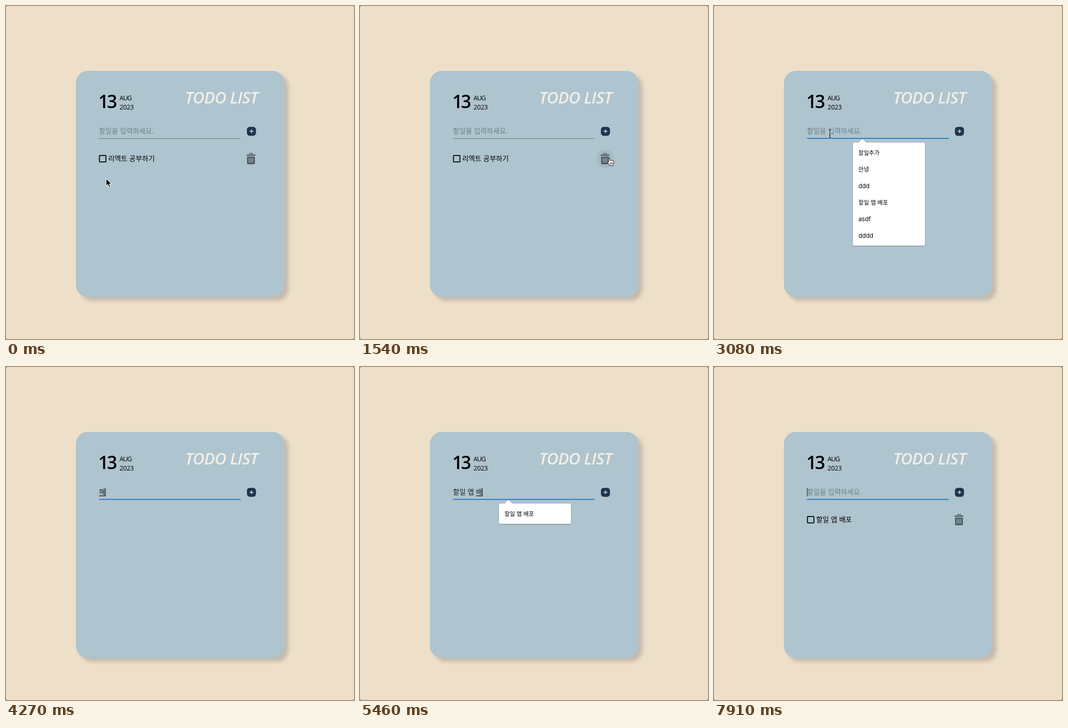
Animation of 754 by 724 pixels, one loop 8 s. Source, as an HTML page:

```html
<!DOCTYPE html>
<html lang="ko">
<head>
<meta charset="utf-8">
<title>Todo list</title>
<style>
  html, body { margin: 0; width: 100%; height: 100%; overflow: hidden; background: #2a2622; }
  svg { display: block; width: 754px; height: 724px; }
  text { white-space: pre; font: 15px "Noto Sans CJK KR", "Noto Sans CJK", sans-serif; }
  .latin { font-family: "Open Sans", "Noto Sans", sans-serif; }
  .day { font-size: 39px; font-weight: 600; letter-spacing: -3.6px; }
  .month { font-size: 14px; letter-spacing: -1.1px; }
  .year { font-size: 14px; letter-spacing: -.3px; }
  .title { font-size: 35px; font-weight: 600; font-style: italic; letter-spacing: -.7px; fill: #f1efe5; }
  .hint { fill: #6f7f88; }
  #menu text { font: 13px Inter, "Noto Sans CJK KR", "Noto Sans CJK", sans-serif; }
  #menu .ko { font-size: 12.4px; }
</style>
</head>
<body>
<svg viewBox="0 0 754 724">
  <defs>
    <filter id="soft" x="-10%" y="-10%" width="120%" height="120%"><feGaussianBlur stdDeviation="4.5"/></filter>
    <filter id="lift" x="-10%" y="-10%" width="120%" height="130%">
      <feDropShadow dx="0" dy="1" stdDeviation="1.2" flood-opacity=".35"/>
    </filter>
  </defs>
  <rect width="754" height="724" rx="3" fill="#eedfc8"/>
  <rect x="160.5" y="149.5" width="451.5" height="491.5" rx="26" fill="#4c4c58" opacity=".25" filter="url(#soft)"/>
  <rect x="151.5" y="141" width="451.5" height="491.5" rx="26" fill="#aec4cf"/>

  <text class="latin day" x="200" y="222">13</text>
  <text class="latin month" x="246" y="204.5">AUG</text>
  <text class="latin year" x="246" y="225">2023</text>
  <text class="latin title" x="388" y="212">TODO LIST</text>

  <text id="hint" class="hint" x="201.5" y="277">할일을 입력하세요.</text>
  <text id="typed" x="201.5" y="277" fill="#17202a"></text>
  <rect id="mark" y="279.5" height="1.5" fill="#17202a"/>
  <rect id="caret" y="263" width="1" height="18" fill="#000"/>
  <rect id="line" x="201.5" width="307"/>

  <rect x="522" y="262.8" width="19.6" height="19.4" rx="6.2" fill="#22334c"/>
  <path d="M531.9 269v6.8M528.5 272.4h6.8" stroke="#d6e0e6" stroke-width="1.6" stroke-linecap="round"/>

  <circle id="glow" cx="531.3" cy="332" r="19.7" fill="#000" opacity=".05"/>
  <g id="item">
    <rect x="202.5" y="325" width="14" height="14" rx="1.2" fill="none" stroke="#000" stroke-width="2"/>
    <text id="task" x="221.5" y="337"></text>
    <g fill="#4c575d">
      <path d="M527.4 323.5v-2.1q0-.9 .9-.9h5.2q.9 0 .9.9v2.1" fill="none" stroke="#4c575d" stroke-width="1.3"/>
      <rect x="521" y="323" width="19.6" height="2.6" rx=".8"/>
      <path d="M522.4 327.4h16.8v14.4q0 2.2-2.2 2.2h-12.4q-2.2 0-2.2-2.2z"/>
    </g>
    <path d="M526.4 330.2v10.6M529.4 330.2v10.6M532.3 330.2v10.6M535.2 330.2v10.6" stroke="#aec4cf" stroke-width="1.2"/>
  </g>

  <g id="menu">
    <g filter="url(#lift)" fill="#fff">
      <rect id="sheet" x="301" y="297" width="156" rx="4"/>
      <path d="M312 298l9.5-9 9.5 9z"/>
    </g>
    <g id="rows"></g>
  </g>

  <circle id="ring" fill="none" stroke="#000" stroke-width="1.5" opacity=".25"/>
  <path id="arrow" d="M0 0v16.2l3.7-3.4 2.6 5.9 2.9-1.3-2.6-5.7h5.1z" fill="#000" stroke="#fff" stroke-width="1.1" stroke-linejoin="round"/>
  <g id="beam" fill="none" stroke-linecap="round">
    <path d="M-3-9q3 0 3 2.4 0-2.4 3-2.4M0-7V7M-3 9q3 0 3-2.4 0 2.4 3 2.4M-1.6 3h3.2" stroke="#fff" stroke-width="2.6" opacity=".75"/>
    <path d="M-3-9q3 0 3 2.4 0-2.4 3-2.4M0-7V7M-3 9q3 0 3-2.4 0 2.4 3 2.4M-1.6 3h3.2" stroke="#000" stroke-width="1.2"/>
  </g>
  <g id="hand" stroke="#000" stroke-linejoin="round" stroke-linecap="round">
    <path d="M-1.6 9.6V2Q-1.6.3-.1.3 1.3.3 1.3 2v4.2q.3-1.1 1.6-1.1 1.2 0 1.4 1.3.4-.8 1.5-.8 1.2 0 1.4 1.3.3-.6 1.2-.6 1.4 0 1.4 1.7v3.4q0 1.6-.8 3.2-.6 1.1-.6 2.4H.6Q.3 15.4-.7 14.1L-3.4 10.5Q-4.2 9.2-3.2 8.5-2.3 8-1.6 9.6z" fill="#fff"/>
    <path d="M2.2 10.5v3.6M4.5 10.5v3.6M6.8 10.5v3.6" fill="none" stroke-width=".9"/>
  </g>
</svg>
<script>
const LOOP = 8000, STEP = 70, LEFT = 201.5;
const $ = id => document.getElementById(id);
const show = (id, on) => { $(id).style.display = on ? '' : 'none'; };
const set = (id, attrs) => { for (const k in attrs) $(id).setAttribute(k, attrs[k]); };
const within = (t, a, b) => t >= a && t < b;
const last = (table, t) => table.filter(row => row[0] <= t).pop();

const words = ['할일추가', '안녕', 'ddd', '할일 앱 배포', 'asdf', 'dddd'];

// time, pointer x, y
const path = [
  [0, 217, 375], [70, 215, 325], [140, 213, 246], [210, 209.5, 263],
  [280, 209.5, 263], [490, 259, 236], [560, 259, 236],
  [700, 290, 268], [770, 325, 285], [980, 456, 330],
  [1190, 456, 330], [1400, 540, 330], [1890, 540, 330],
  [2170, 440, 305], [2380, 300, 280], [2730, 262, 277],
  [2800, 259, 277], [2940, 251, 277.5]
];
const shapes = [[0, 'arrow'], [700, 'beam'], [840, 'arrow'], [1540, 'hand'],
  [1820, 'arrow'], [2310, 'beam'], [3220, 'none']];

// time, typed text
const typing = [
  [0, ''], [3220, 'g'], [3500, 'gk'], [3850, 'g'], [3920, ''],
  [4060, 'ㅎ'], [4130, '하'], [4270, '해'], [4410, '하'], [4480, '할'],
  [4620, '할ㅇ'], [4690, '할이'], [4830, '할일'], [4900, '할일 '],
  [4970, '할일 애'], [5110, '할일 앱'], [5250, '할일 앱 '], [5320, '할일 앱 ㅂ'],
  [5390, '할일 앱 배'], [5530, '할일 앱 뱊'], [5670, '할일 앱 배포'], [5810, '']
];
const blink = [[0, 0], [2450, 1], [2940, 0], [3220, 1], [6370, 0], [6860, 1], [7420, 0], [7910, 1]];

function pointer(t) {
  const i = path.findIndex(p => p[0] > t);
  if (i < 0) return path[path.length - 1].slice(1);
  const [a, b] = [path[i - 1], path[i]], k = (t - a[0]) / (b[0] - a[0]);
  return [1, 2].map(n => a[n] + (b[n] - a[n]) * k);
}

function suggestions(t, text) {
  if (within(t, 2730, 3220)) return words;
  if (!within(t, 4480, 5670) || !text) return [];
  return words.filter(w => w.startsWith(text));
}

let shown = '';
function drawMenu(list) {
  show('menu', list.length);
  if (shown === list.join()) return;
  shown = list.join();
  set('sheet', { height: 8 + 36 * list.length });
  $('rows').innerHTML = list.map((w, i) => {
    const latin = /[a-z]/.test(w);
    return `<text x="313" y="${(latin ? 324 : 323.5) + 36 * i}" class="${latin ? 'en' : 'ko'}">${w}</text>`;
  }).join('');
}

function drawField(t) {
  const text = last(typing, t)[1], typed = $('typed');
  if (typed.textContent !== text) typed.textContent = text;
  const width = text ? typed.getComputedTextLength() : 0;
  const composing = /[ㄱ-ㅎ가-힣]$/.test(text);
  show('hint', !text);
  show('mark', composing);
  if (composing) set('mark', { x: LEFT + width - 13.8, width: 13.8 });
  show('caret', last(blink, t)[1]);
  set('caret', { x: LEFT + Math.max(0, width - .5) });

  const focus = t >= 2450, hover = within(t, 700, 840) || within(t, 2310, 2450);
  set('line', {
    y: focus || hover ? 286.9 : 287.6,
    height: focus || hover ? 1.9 : 1,
    fill: focus ? '#1e73c8' : hover ? '#000' : '#606d75'
  });
  drawMenu(suggestions(t, text));
}

function drawPointer(t) {
  const [x, y] = pointer(t), shape = last(shapes, t)[1];
  for (const id of ['arrow', 'beam', 'hand']) {
    show(id, id === shape);
    set(id, { transform: `translate(${x} ${y})` });
  }
  const tap = within(t, 1750, 1820), press = within(t, 2800, 3080);
  show('ring', tap || press);
  set('ring', { cx: tap ? 542 : x, cy: tap ? 330.5 : y, r: tap ? 31.5 : 17.5 });
}

function draw(ms) {
  const t = Math.floor(ms / STEP + 1e-6) * STEP;
  const added = t >= 5810;
  show('item', t < 1820 || added);
  $('task').textContent = added ? words[3] : '리엑트 공부하기';
  show('glow', within(t, 1400, 1820));
  drawField(t);
  drawPointer(t);
}

const start = performance.now();
function tick() {
  draw((performance.now() - start) % LOOP);
  requestAnimationFrame(tick);
}
tick();
</script>
</body>
</html>
```
